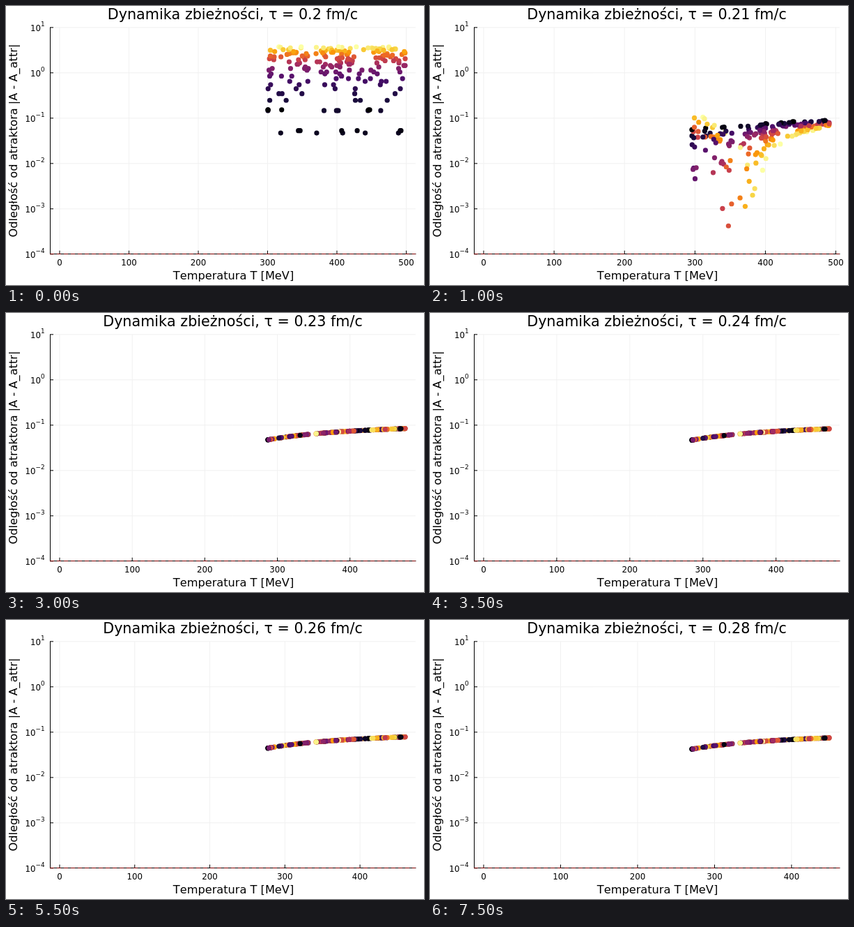
These frames come from a looping animation (600x400 px, 8 s). An HTML page with a canvas:

```html
<!DOCTYPE html>
<html lang="pl">
<head>
<meta charset="utf-8">
<style>
  html, body { margin: 0; width: 100%; height: 100%; overflow: hidden; background: #fff; }
  canvas { display: block; }
</style>
</head>
<body>
<canvas id="stage" width="600" height="400"></canvas>
<script>
const ctx = document.getElementById('stage').getContext('2d');
const LEFT = 63, RIGHT = 588, TOP = 30.8, BOTTOM = 355.7, ZERO = 77, SCALE = 0.995;
const STEP_MS = 500, STEPS = 16, COUNT = 200, LEVELS = 40;
const INFERNO = ['000004', '1b0c41', '4a0c6b', '781c6d', 'a52c60',
                 'cf4446', 'ed6925', 'fb9b06', 'f7d13d', 'fcffa4'];

let seed = 11;
const random = () => (seed = (seed * 16807) % 2147483647) / 2147483647;

// Starting anisotropy is level / 10; the cloud has a narrow empty band in x.
function randomPoint(i) {
  const x = 376 + random() * 186;
  return { x: x < 434 ? x : x + 11, level: (i * 7) % LEVELS };
}
const points = [
  { x: 376, level: 3 },
  ...Array.from({ length: COUNT - 3 }, (_, i) => randomPoint(i)),
  { x: 573, level: 22 },
  { x: 567, level: 1 }
];

function inferno(v) {
  const i = Math.min(8, Math.floor(v * 9)), f = v * 9 - i;
  const channel = (hex, c) => parseInt(hex.slice(2 * c, 2 * c + 2), 16);
  const rgb = [0, 1, 2].map(c =>
    Math.round(channel(INFERNO[i], c) * (1 - f) + channel(INFERNO[i + 1], c) * f));
  return `rgb(${rgb})`;
}

const yOf = distance => 95.8 - 65 * Math.log10(distance);

// Exponential relaxation onto a slowly falling curve.
function distanceAt(p, step, tau) {
  const temp = (p.x - ZERO) / SCALE;
  const curve = t => (0.1401 - 27.8 / temp) * (t / 0.23) ** (-2 / 3);
  const excess = p.level / 10 - 0.153 + curve(0.2);
  return Math.abs(excess * Math.exp(-step * temp / 200) - curve(tau));
}

function line(x1, y1, x2, y2, color) {
  ctx.strokeStyle = color;
  ctx.beginPath();
  ctx.moveTo(x1, y1);
  ctx.lineTo(x2, y2);
  ctx.stroke();
}

function text(str, x, y, size, align = 'center') {
  ctx.font = `${size}px "DejaVu Sans", sans-serif`;
  ctx.textAlign = align;
  ctx.fillText(str, x, y);
}

// Two decimals, with exact halves going to the even digit.
function tauLabel(step) {
  const half = step / 2, low = Math.floor(half);
  const cents = 20 + (half === low ? low : low + low % 2);
  return String(cents / 100);
}

function draw(step) {
  const tau = 0.2 + step * 0.005;
  const scale = SCALE * (tau / 0.2) ** 0.329;
  const xTicks = [0, 100, 200, 300, 400, 500]
    .map(value => ({ value, x: ZERO + value * scale }))
    .filter(t => t.x <= RIGHT);
  const yTicks = [1, 0, -1, -2, -3, -4].map(power => ({ power, y: yOf(10 ** power) }));

  ctx.fillStyle = '#fff';
  ctx.fillRect(0, 0, 600, 400);
  ctx.lineWidth = 1;
  ctx.fontKerning = 'none';

  xTicks.forEach(t => line(t.x, TOP, t.x, BOTTOM, '#f1f1f1'));
  yTicks.forEach(t => line(LEFT, t.y, RIGHT, t.y, '#f1f1f1'));
  line(LEFT + 0.5, TOP, LEFT + 0.5, 356, '#000');
  line(LEFT, 355.5, RIGHT + 0.5, 355.5, '#000');
  xTicks.forEach(t => line(t.x, BOTTOM, t.x, BOTTOM - 5, '#000'));
  yTicks.forEach(t => line(LEFT, t.y, LEFT + 5, t.y, '#000'));

  // Dashed reference line on the lower axis
  ctx.setLineDash([6, 4]);
  line(LEFT, 355.5, RIGHT, 355.5, 'rgba(255, 0, 0, 0.5)');
  ctx.setLineDash([]);

  points.forEach(p => {
    ctx.fillStyle = inferno(p.level / (LEVELS - 1));
    ctx.beginPath();
    ctx.arc(p.x, yOf(distanceAt(p, step, tau)), 3.6, 0, 2 * Math.PI);
    ctx.fill();
  });

  ctx.fillStyle = '#000';
  xTicks.forEach(t => text(t.value, t.x, 371.5, 11.8));
  yTicks.forEach(t => {
    const exponent = String(t.power).replace('-', '−');
    text(exponent, 55.5, t.y - 2.3, 8.8, 'right');
    const width = ctx.measureText(exponent).width;
    text('10', 55.5 - width, t.y + 5.2, 11.8, 'right');
  });
  text(`Dynamika zbieżności, τ = ${tauLabel(step)} fm/c`, 325.5, 18.5, 20.7);
  text('Temperatura T [MeV]', 326.5, 392, 16.2);
  ctx.save();
  ctx.translate(16, 193);
  ctx.rotate(-Math.PI / 2);
  text('Odległość od atraktora |A - A_attr|', 0, 0, 16.2);
  ctx.restore();
}

const start = performance.now();
function tick() {
  draw(Math.floor((performance.now() - start) / STEP_MS) % STEPS);
  requestAnimationFrame(tick);
}
tick();
</script>
</body>
</html>
```
